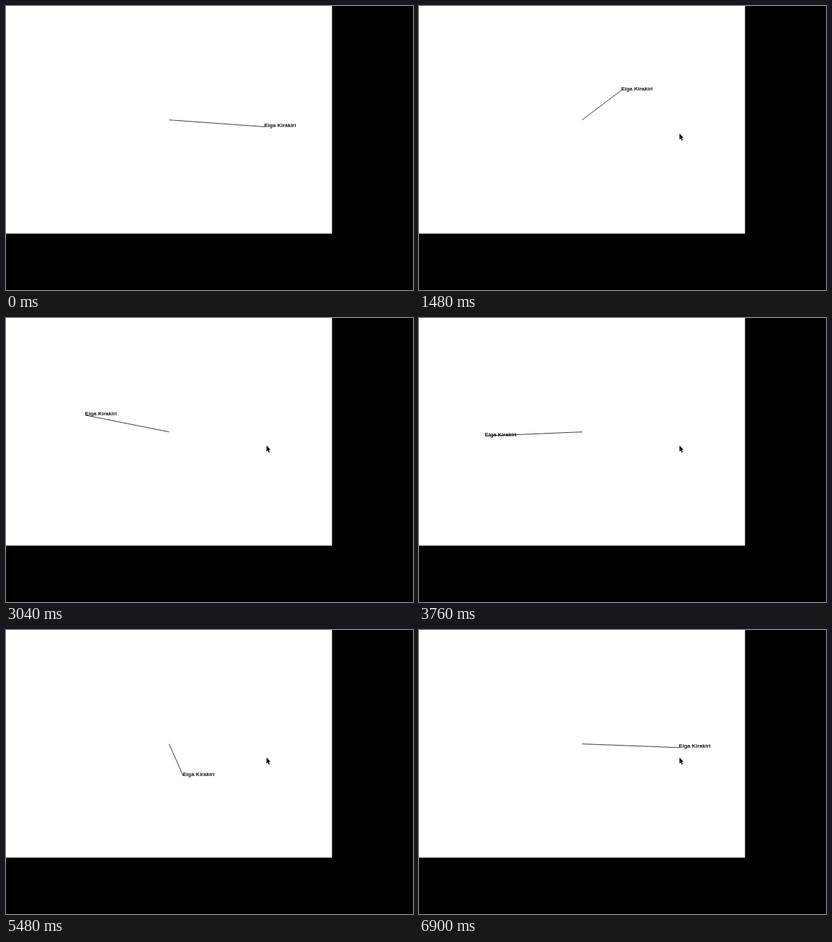
Write an HTML page that moves like this. It is 600x420 px and loops after 6920 ms.

```html
<!DOCTYPE html>
<html lang="en">
<head>
<meta charset="utf-8">
<title>Orbiting label</title>
<style>
  html, body { margin: 0; width: 100%; height: 100%; overflow: hidden; background: #000; }
  svg { display: block; }
  text { font: bold 8px "Liberation Sans", Arial, sans-serif; }
</style>
</head>
<body>
<svg width="600" height="420" viewBox="0 0 600 420">
  <rect width="600" height="420" fill="#000"/>
  <rect width="480.6" height="336.6" fill="#fff"/>
  <line id="arm" x1="240.5" y1="168.5" stroke="#000" stroke-width="0.8"/>
  <text id="label" fill="#111">Eiga Kirakiri</text>
  <path id="cursor" d="M0 .5V9.4L2 7.6 3.3 11 4.9 10.4 3.5 7H5.9Z" fill="#000"/>
</svg>
<script>
const LOOP = 6920, TICK = 20;
const CENTER = { x: 240, y: 168 }, RADIUS = { x: 144, y: 48 };
const START_ANGLE = 0.212, SPEED = 0.000925;
const ENTRY = { x: 459, y: 90 }, REST = { x: 384, y: 188 };
const ENTRY_START = 20, ENTRY_TIME = 460;

const arm = document.getElementById("arm");
const label = document.getElementById("label");
const cursor = document.getElementById("cursor");

const mix = (a, b, k) => a + (b - a) * k;

function setAttributes(node, values) {
  for (const key in values) node.setAttribute(key, values[key]);
}

function drawOrbit(t) {
  const angle = START_ANGLE - SPEED * t;
  const x = CENTER.x + RADIUS.x * Math.cos(angle);
  const y = CENTER.y + RADIUS.y * Math.sin(angle);
  setAttributes(arm, { x2: x + 0.5, y2: y + 0.5 });
  setAttributes(label, { x, y: y + 1 });
}

function drawCursor(t) {
  const k = Math.min(1, Math.max(0, (t - ENTRY_START) / ENTRY_TIME));
  const eased = 1 - (1 - k) ** 3;
  const x = Math.round(mix(ENTRY.x, REST.x, eased));
  const y = Math.round(mix(ENTRY.y, REST.y, eased));
  setAttributes(cursor, {
    transform: `translate(${x} ${y})`,
    visibility: t < ENTRY_START ? "hidden" : "visible"
  });
}

function render(now) {
  const t = Math.floor(((now - origin) % LOOP) / TICK) * TICK;
  drawOrbit(t);
  drawCursor(t);
}

const origin = performance.now();

function frame() {
  render(performance.now());
  requestAnimationFrame(frame);
}

frame();
</script>
</body>
</html>
```
